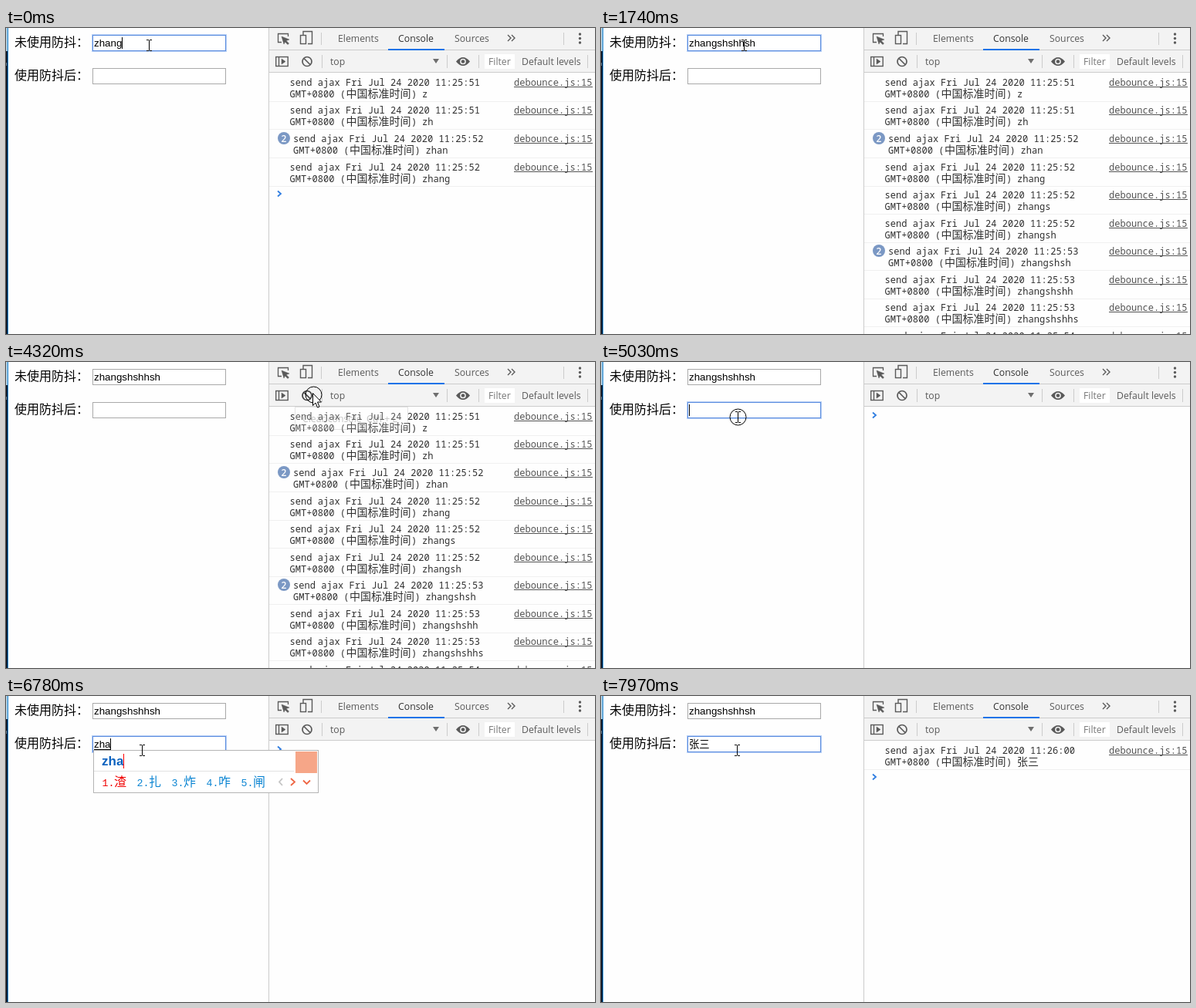
Write an HTML page with a canvas that moves like this. It is 763 px wide and 397 px high and loops after 8000 ms.

```html
<!DOCTYPE html>
<html lang="zh-CN">
<head>
<meta charset="utf-8">
<title>Debounce demo</title>
<style>
html, body { margin: 0; width: 763px; height: 397px; overflow: hidden; background: #fff; }
canvas { display: block; width: 763px; height: 397px; }
</style>
</head>
<body>
<canvas id="stage" width="763" height="397"></canvas>
<script>
const c = document.getElementById('stage').getContext('2d');
const LOOP = 8000;
const CJK = '"Noto Sans CJK SC", "Noto Sans CJK", sans-serif';
const UI = '12.25px "Open Sans", sans-serif';
const MONO = '12.08px "Noto Sans Mono", monospace';
const INPUT = '13.33px "Liberation Sans", ' + CJK;

// Timelines: [start, value], each value holds until the next start.
const typed = [[0, 'zhang'], [150, 'zhangs'], [270, 'zhangsh'], [420, 'zhangshsh'],
  [1000, 'zhangshshh'], [1150, 'zhangshshhs'], [1300, 'zhangshshhsh']];
const rows = [[0, 4], [150, 5], [270, 6], [570, 7], [1000, 8], [1150, 9], [1300, 10], [4440, 0]];
const focus = [[0, 1], [4320, 0], [5030, 2]];
const caret = [[0, 1], [1740, 0], [2250, 1], [2830, 0], [3350, 1], [3890, 0],
  [5030, 1], [5540, 0], [6100, 1], [7850, 0]];
const pointer = [[0, ['beam', 185, 22]], [2010, ['arrow', 228, 72]], [2130, ['arrow', 300, 165]],
  [2250, ['arrow', 362, 248]], [2400, ['arrow', 392, 288]], [2680, ['arrow', 418, 352]],
  [2830, ['arrow', 440, 382]], [3000, ['arrow', 458, 330]], [3200, ['arrow', 462, 232]],
  [3350, ['arrow', 458, 167]], [3470, ['arrow', 445, 108]], [3620, ['arrow', 425, 52]],
  [3770, ['arrow', 406, 58]], [3890, ['arrow', 400, 46]], [4040, ['arrow', 397, 40]],
  [4590, ['beam', 177, 71]], [5420, ['beam', 176, 70]]];
const pinyin = [[0, ''], [6510, 'z'], [6630, 'zh'], [6780, 'zha'], [6900, 'zhang'],
  [7020, "zhang's"], [7140, "zhang'san"], [7290, '']];
const words = {
  'z': '在 中 这 再 最', 'zh': '这 中 只 着 之', 'zha': '渣 扎 炸 咋 闸', 'zhang': '张 长 章 丈 涨',
  "zhang's": '张三 掌上 张姗 丈势 长势', "zhang'san": '张三 张散 张叁 长三 章三'
};
const logs = [['51', 'z'], ['51', 'zh'], ['52', 'zhan', 2], ['52', 'zhang'], ['52', 'zhangs'],
  ['52', 'zhangsh'], ['53', 'zhangshsh', 2], ['53', 'zhangshshh'], ['53', 'zhangshshhs'],
  ['54', 'zhangshshhsh']].map(([s, v, n]) => ({ time: '11:25:' + s, value: v, count: n }));
const lateLog = [{ time: '11:26:00', value: '张三' }];

function at(list, t) {
  let v = list[0][1];
  for (const [start, value] of list) if (t >= start) v = value;
  return v;
}

function box(x, y, w, h, color) {
  c.fillStyle = color;
  c.fillRect(x, y, w, h);
}

function frame(x, y, w, h, color) {
  c.strokeStyle = color;
  c.lineWidth = 1;
  c.strokeRect(x + .5, y + .5, w - 1, h - 1);
}

function text(s, x, y, font, color) {
  c.font = font;
  c.fillStyle = color;
  c.fillText(s, x, y);
  return c.measureText(s).width;
}

function line(points, color, width = 1, fill) {
  c.beginPath();
  for (let i = 0; i < points.length; i += 2) c.lineTo(points[i], points[i + 1]);
  if (fill) {
    c.closePath();
    c.fillStyle = fill;
    c.fill();
  }
  c.strokeStyle = color;
  c.lineWidth = width;
  c.stroke();
}

function circle(x, y, r, fill, stroke, width = 1) {
  c.beginPath();
  c.arc(x, y, r, 0, Math.PI * 2);
  if (fill) { c.fillStyle = fill; c.fill(); }
  if (stroke) { c.strokeStyle = stroke; c.lineWidth = width; c.stroke(); }
}

function field(label, y, value, focused, caretOn, composing) {
  text(label, 11, y + 15, '16px ' + CJK, '#000');
  box(112, y, 173, 21, '#fff');
  if (focused) {
    frame(111, y - 1, 175, 23, '#b9d0f5');
    frame(112, y, 173, 21, '#5a8cdf');
  } else frame(112, y, 173, 21, '#a9a9a9');
  const w = text(value, 114, y + 15, INPUT, '#000');
  if (composing) box(114, y + 17, Math.round(w), 1, '#000');
  if (focused && caretOn) box(Math.floor(114.2 + w), y + 3, 1, 15, '#000');
}

function toolbar(hoverTop, hoverClear) {
  const ink = '#5a5a5a', sep = '#ccc';
  box(341, 0, 422, 57, '#f3f3f3');
  box(341, 28, 422, 1, sep);
  box(341, 57, 422, 1, sep);
  box(340, 0, 1, 397, sep);
  for (const x of [408, 722]) box(x, 6, 1, 16, sep);
  for (const x of [409, 571, 612, 753]) box(x, 35, 1, 17, sep);

  // inspect and device icons
  line([357, 18.5, 352.5, 18.5, 352.5, 7.5, 365.5, 7.5, 365.5, 11], ink, 1.3);
  line([357, 11, 367, 15, 363, 16.5, 366.5, 20, 365, 21.5, 361.5, 18, 360, 21], ink, .5, ink);
  line([385, 9, 385, 4.5, 396.5, 4.5, 396.5, 20.5, 391, 20.5], ink, 1.4);
  c.strokeStyle = ink;
  c.strokeRect(381.5, 9.5, 7, 11);

  text('Elements', 430, 18, UI, ink);
  text('Console', 508, 18, UI, '#333');
  text('Sources', 581, 18, UI, ink);
  box(495, 27, 73, 2, '#1a73e8');
  for (const x of [650, 655]) line([x, 9, x + 4, 13, x, 17], ink, 1.4);
  for (const y of [8, 13.5, 19]) circle(743.5, y, 1.7, ink);

  // sidebar toggle, clear, eye
  c.lineWidth = 1.4;
  c.strokeRect(349.7, 37.5, 15.5, 12);
  line([353.5, 37, 353.5, 50], ink, 1.4);
  line([357, 40, 362, 43.5, 357, 47], ink, .5, ink);
  const clear = hoverClear ? '#3c3c3c' : ink;
  circle(390, 43.5, 6, null, clear, 1.7);
  line([386, 39.5, 394, 47.5], clear, 1.7);
  text('top', 420, 48, UI, hoverTop ? '#222' : ink);
  line([553, 40, 561, 40, 557, 46], 'transparent', 1, hoverTop ? '#222' : '#6e6e6e');
  c.beginPath();
  c.moveTo(583, 43.5);
  c.quadraticCurveTo(592, 32.5, 601, 43.5);
  c.quadraticCurveTo(592, 54.5, 583, 43.5);
  c.fillStyle = ink;
  c.fill();
  circle(592, 43.5, 3.1, ink, '#f3f3f3', 1.5);

  box(620, 34, 39, 19, '#fff');
  text('Filter', 625, 48, UI, '#777');
  c.save();
  c.beginPath();
  c.rect(660, 30, 85, 27);
  c.clip();
  text('Default levels', 668, 48, UI, ink);
  c.restore();
}

const rowTop = i => Math.round(36.55 * i - .1);

function consoleRows(list) {
  const ink = '#303030';
  list.forEach((log, i) => {
    const y = rowTop(i), x = log.count ? 372 : 367.5;
    if (log.count) {
      circle(360, y + 70, 8, '#7b98c4');
      text(log.count, 356.5, y + 74.5, '600 12px "Open Sans", sans-serif', '#fff');
    }
    text('send ajax Fri Jul 24 2020 ' + log.time, x, y + 75, MONO, ink);
    text('GMT+0800 (', x, y + 90, MONO, ink);
    text('中国标准时间', x + 73, y + 90, '14px ' + CJK, ink);
    text(') ', x + 157.5, y + 90, MONO, ink);
    const wide = log.value > '~';
    text(log.value, x + 171.5, y + 90, wide ? '14px ' + CJK : MONO, ink);
    text('debounce.js:15', 658, y + 75, MONO, '#545454');
    box(658, y + 76, 102, 1, '#545454');
    box(341, y + 95, 422, 1, '#f0f0f0');
  });
  const y = rowTop(list.length) + 69;
  line([352, y - 3.5, 356, y, 352, y + 3.5], '#2f7de1', 1.8);
}

function imePanel(py) {
  const list = words[py].split(' '), pitch = 29 + 16 * list[0].length;
  const right = 180 + pitch * 5;
  box(113, 70, right - 113, 56, '#fff');
  frame(113, 70, right - 113, 56, '#b4b4b4');
  box(114, 97, right - 146, 1, '#e2e2e2');
  const w = text(py, 124, 90, 'bold 17px "Liberation Sans", sans-serif', '#0b62bf');
  box(Math.round(124 + w), 75, 1, 19, '#f00');
  list.forEach((word, i) => {
    const x = 124.5 + pitch * i, color = i ? '#0a84d2' : '#f00000';
    text(i + 1 + '.', x, 117, '13.3px "Liberation Mono", monospace', color);
    text(word, x + 15.5, 117, '300 16px ' + CJK, color);
  });
  line([right - 47, 107, right - 51, 111.5, right - 47, 116], '#c4c4c4', 1.8);
  line([right - 36, 107, right - 31, 111.5, right - 36, 116], '#ee6644', 1.8);
  line([right - 20, 109.5, right - 15.5, 114, right - 11, 109.5], '#ee6644', 1.8);
  box(right - 30, 72, 28, 28, '#f6a688');
}

function tooltip() {
  c.globalAlpha = .2;
  box(374, 58, 147, 30, '#fff');
  frame(374, 58, 147, 30, '#777');
  c.globalAlpha = .35;
  text('Clear console  Ctrl + L', 384, 78, UI, '#575757');
  c.globalAlpha = 1;
}

function drawPointer([kind, x, y]) {
  if (kind === 'beam') {
    line([x + .5, y - 6, x + .5, y + 7], '#000', 1);
    for (const e of [y - 7, y + 7]) {
      box(x - 3, e, 3, 1, '#000');
      box(x + 1, e, 3, 1, '#000');
    }
  } else {
    line([x + .5, y + .5, x + .5, y + 16.5, x + 4, y + 13, x + 6.5, y + 19, x + 9, y + 18,
      x + 6.5, y + 12, x + 11.5, y + 12, x + .5, y + .5], '#000', 1, '#fff');
  }
}

function draw(t) {
  box(0, 0, 763, 397, '#fefefe');
  box(0, 0, 2, 30, '#a9cbe0');
  box(0, 30, 2, 367, '#0b1a2e');
  box(0, 45, 1, 4, '#5f7f96');
  box(2, 0, 1, 397, '#1d84d0');

  const on = at(caret, t), f = at(focus, t), py = at(pinyin, t);
  field('未使用防抖：', 9, at(typed, t), f === 1, on);
  field('使用防抖后：', 52, t >= 7290 ? '张三' : py, f === 2, on, py);

  toolbar(t >= 3620 && t < 3770, t >= 3890 && t < 4590);
  consoleRows(t >= 7970 ? lateLog : logs.slice(0, at(rows, t)));
  if (t >= 4320 && t < 4440) {
    tooltip();
    circle(398.5, 42.5, 10.5, null, '#000');
  }
  if (py) imePanel(py);
  if (t >= 5030 && t < 5150) circle(177.5, 71.5, 10.5, null, '#000');
  drawPointer(at(pointer, t));
}

const start = performance.now();
function tick() {
  draw((performance.now() - start) % LOOP);
  requestAnimationFrame(tick);
}
tick();
</script>
</body>
</html>
```
